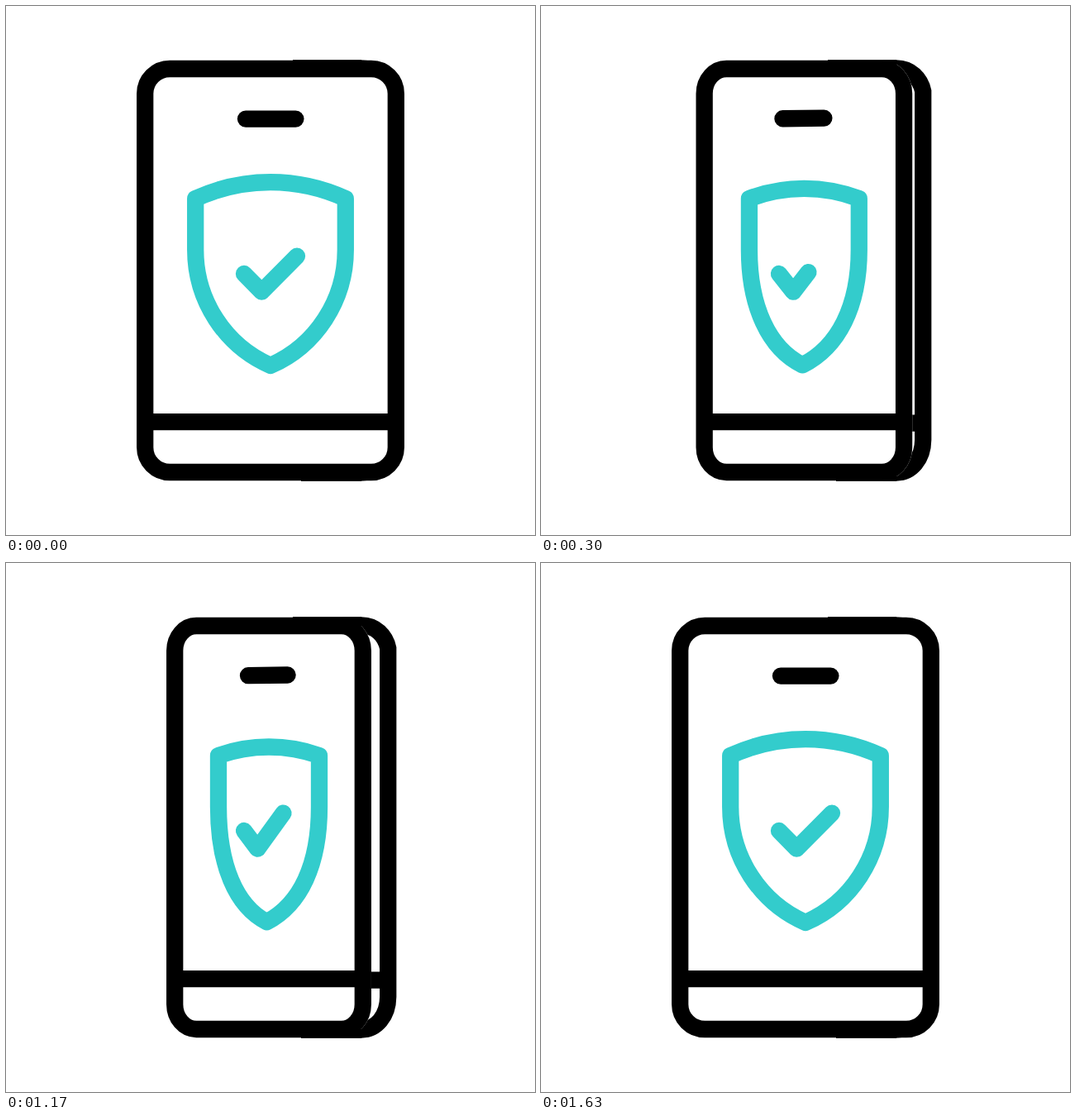
Recreate the animation shown at these times as an HTML page. Size 640x640 px, loop 1.67 s.

```html
<!DOCTYPE html>
<html lang="en">
<head>
<meta charset="utf-8">
<title>Phone security</title>
<style>
  html, body { margin: 0; width: 100%; height: 100%; overflow: hidden; background: #fff; }
  svg { display: block; width: 100vw; height: 100vh; }
  .ink, .teal { fill: none; stroke-width: 20.3; }
  .ink { stroke: #000; }
  .teal { stroke: #3cc; stroke-linecap: round; stroke-linejoin: round; }
</style>
</head>
<body>
<svg viewBox="0 0 640 640">
  <mask id="behind" maskUnits="userSpaceOnUse" x="0" y="0" width="640" height="640">
    <rect width="640" height="640" fill="#fff"/>
    <rect class="body" y="76" height="488" ry="30" stroke="#000" stroke-width="20.3"/>
  </mask>
  <g mask="url(#behind)">
    <path class="ink" d="M347 75.4H430C447 75.4 459 88 462.2 103V525C462 548 448 564.5 430 564.5H357M430 504.7H462"/>
  </g>
  <!-- the rear frame's long edges stay visible just past the front frame -->
  <path d="M347 65.2H430V76H347ZM357 564H430V574.7H357Z"/>
  <rect class="body ink" y="76" height="488" ry="30"/>
  <path id="bar" class="ink"/>
  <path id="speaker" class="ink" stroke-linecap="round"/>
  <path id="shield" class="teal"/>
  <path id="check" class="teal" pathLength="1"/>
  <path id="rays" class="teal"/>
</svg>
<script>
const LOOP = 1670, FRAME = 1000 / 30;
const $ = id => document.getElementById(id);
const bodies = document.querySelectorAll('.body');

const clamp = v => Math.min(1, Math.max(0, v));
const ramp = (f, from, to) => clamp((f - from) / (to - from));
const mix = (a, b, t) => a + (b - a) * t;
const setPath = (id, d) => $(id).setAttribute('d', d);

function drawPhone(turn) {
  const left = 168.2 + 36 * turn;
  const right = 471.8 - 40 * turn;
  for (const body of bodies) {
    body.setAttribute('x', left);
    body.setAttribute('width', right - left);
    body.setAttribute('rx', 30 - 4 * turn);
  }
  setPath('bar', `M${left} 503.2H${right}`);
  setPath('speaker', `M${290 + 3 * turn} ${136.6 - 0.4 * turn}L${350.4 - 9.8 * turn} ${136.6 - 1.1 * turn}`);
}

function drawShield(turn) {
  const left = 229.2 + 27.8 * turn;
  const right = 410.8 - 31.8 * turn;
  const tip = 320 - 4.5 * turn;
  const bottom = 435 - 0.8 * turn;
  const crown = 206.5 + 12.5 * turn;
  const belly = 356 + 9 * turn;
  const low = 411 + 4 * turn;
  const pull = 0.395 - 0.035 * turn;
  setPath('shield', `M${right} 233
    C${mix(right, left, 0.32)} ${crown} ${mix(left, right, 0.32)} ${crown} ${left} 233
    V295C${left} ${belly} ${mix(left, tip, pull)} ${low} ${tip} ${bottom}
    C${mix(right, tip, pull)} ${low - 2 * turn} ${right} ${belly} ${right} 295Z`);
}

function drawCheck(f, turn) {
  const drawn = f < 20 ? 1 - ramp(f, 6, 16) : ramp(f, 23, 33.4);
  const check = $('check');
  setPath('check', `M288 324L${309.3 - 5 * turn} 345.7L${352 - 16.5 * turn} 302.6`);
  check.style.display = f > 16 && f < 24 ? 'none' : '';
  check.setAttribute('stroke-dasharray', drawn < 1 ? `${Math.max(drawn, 0.001)} 3` : 'none');
}

// Three sparks fan out from the phone's side: i = -1 is the top one, 1 the bottom one.
function drawRays(f) {
  const head = ramp(f, 27, 33.5);
  const tail = ramp(f, 29, 35);
  let d = '';
  for (let i = -1; i <= 1 && head > tail; i++) {
    const y = 296 + 38 * i + 2 * i * i;
    const dx = 8 * i * i - 62;
    const dy = 27 * i - 6 * i * i;
    const at = t => `${194.5 + dx * t} ${y + dy * t}`;
    d += `M${at(tail)}L${at(head)}`;
  }
  setPath('rays', d);
}

function draw(ms) {
  const f = Math.min(49, Math.floor((ms + 4) / FRAME));
  const turn = ramp(f, 0, 11) - ramp(f, 39, 49);
  drawPhone(turn);
  drawShield(turn);
  drawCheck(f, turn);
  drawRays(f);
}

const start = performance.now();
function tick() {
  draw((performance.now() - start) % LOOP);
  requestAnimationFrame(tick);
}
draw(0);
requestAnimationFrame(tick);
</script>
</body>
</html>
```
